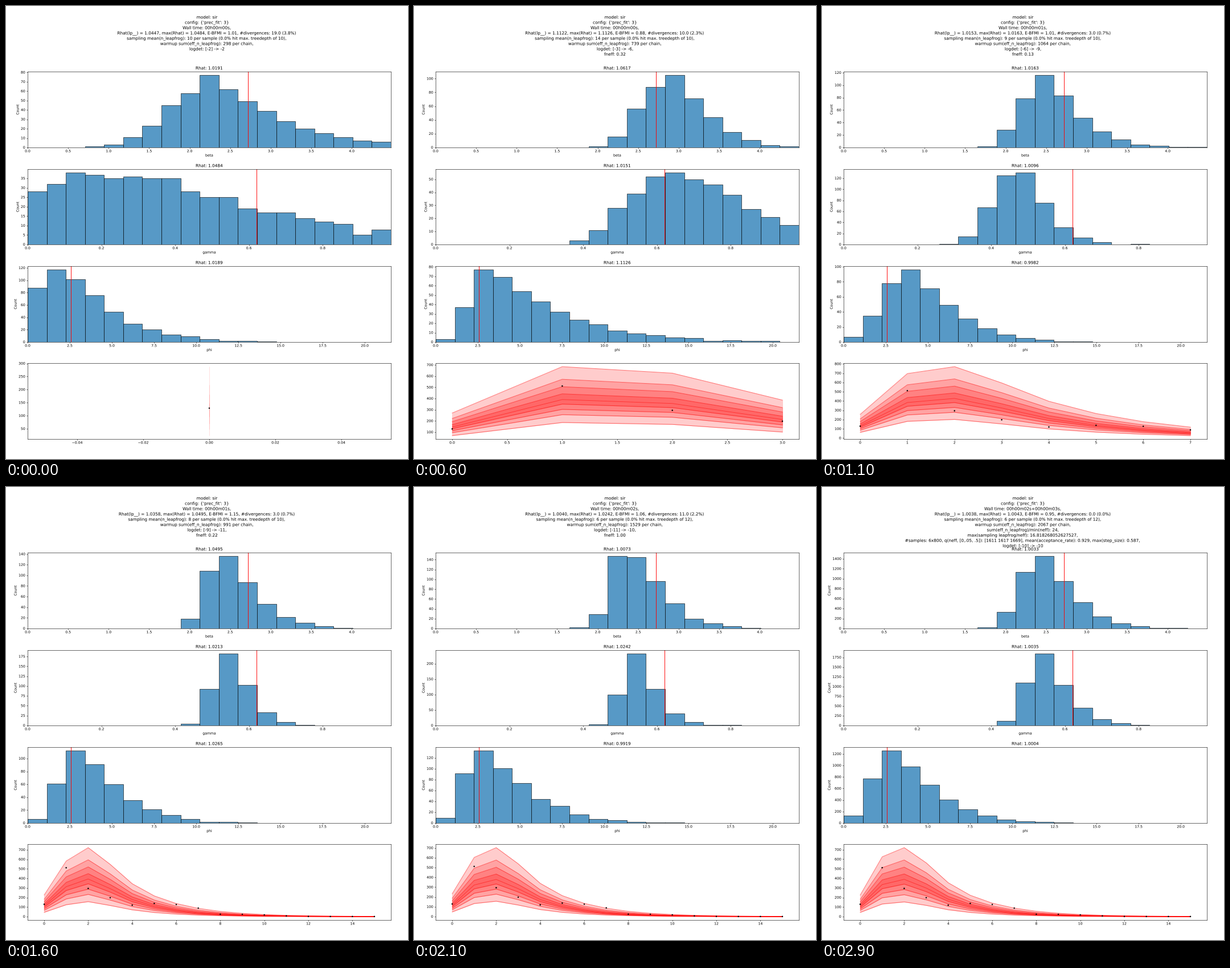
Recreate the animation shown at these times as a matplotlib script. Size 706 px wide and 794 px high, loop 3.1 s.

```python
import numpy as np
import matplotlib.pyplot as plt
from matplotlib import patheffects
from matplotlib.animation import FuncAnimation

W, H, DPI = 706, 794, 44.125
BINS = 19
LEFT, RIGHT = 38, 676
PARAMS = [("beta", 4.484, 2.718), ("gamma", 0.985, 0.6205), ("phi", 21.55, 2.57)]
OBSERVED = [129, 512, 295, 198, 120, 138, 127, 89, 25, 24, 18, 7, 2, 1, 1, 1]
LEVELS = [-1, -0.57, -0.34, -0.145, 0, 0.22, 0.46, 0.68, 1]

plt.rcParams.update({
    "axes.linewidth": 0.95,
    "xtick.major.width": 0.95,
    "ytick.major.width": 0.95,
    # Drawing text as paths keeps its sub-pixel position.
    "path.effects": [patheffects.Normal()],
})
rng = np.random.default_rng(3)


def header(wall, lp, top, bfmi, div, leap, depth, warm, *rest):
    return [
        "model: sir",
        "config: {'prec_fit': 3}",
        f"Wall time: {wall},",
        f"Rhat(lp__) = {lp}, max(Rhat) = {top}, E-BFMI = {bfmi}, #divergences: {div}",
        f"sampling mean(n_leapfrog): {leap} per sample (0.0% hit max. treedepth of {depth}),",
        f"warmup sum(eff_n_leapfrog): {warm} per chain,",
        *rest,
    ]


def histogram(peak, mode, left, right):
    """Skewed bell over the bins with a little sampling noise."""
    d = np.arange(BINS) - mode
    shape = np.exp(-np.where(d < 0, np.abs(d / left) ** 2.4, np.abs(d / right) ** 1.35))
    shape += 0.4 * np.sqrt(shape / peak) * rng.normal(size=BINS)
    return np.round(peak * np.clip(shape / shape.max(), 0, 1))


def epidemic(days, low, high, *start, fall=0.61):
    """Quantile curves around a median that decays after its first days."""
    mid = np.append(start, start[-1] * fall ** np.arange(1, days - len(start) + 1))
    high = high * (mid.max() / mid) ** 0.1
    return [mid * np.exp(z * (low if z < 0 else high)) for z in LEVELS]


stages = []


def stage(head, rhats, beta, gamma, phi, curves):
    stages.append((head, rhats.split(), [histogram(*p) for p in (beta, gamma, phi)], curves))


stage(header("00h00m00s", "1.0447", "1.0484", "1.01", "19.0 (3.8%)", 10, 10, 298,
             "logdet: [-2] -> -2"),
      "1.0191 1.0484 1.0189",
      (77, 9.3, 3.4, 4.3), (38, 4.5, 8, 9.5), (117, 1, 1.63, 3.2),
      epidemic(1, 1.626, 0.859, 122))

stage(header("00h00m00s", "1.0968", "1.0226", "0.68", "7.0 (2.8%)", 9, 10, 769,
             "logdet: [-2] -> -3,", "fneff: 0.66"),
      "1.0174 1.0186 1.0226",
      (51, 9.8, 1.75, 3), (24, 4, 4.2, 8), (57, 1, 0.94, 3.4),
      epidemic(2, 1.18, 0.673, 139, 398))

stage(header("00h00m00s", "1.1122", "1.1126", "0.88", "10.0 (2.3%)", 14, 10, 739,
             "logdet: [-3] -> -6,", "fneff: 0.32"),
      "1.0617 1.0151 1.1126",
      (105, 12, 2.3, 2.1), (55, 12.3, 3.4, 4.5), (77, 2, 1.2, 4.5),
      epidemic(4, 0.74, 0.561, 146, 391, 356, 213))

stage(header("00h00m01s", "1.0153", "1.0163", "1.01", "3.0 (0.7%)", 9, 10, 1064,
             "logdet: [-6] -> -9,", "fneff: 0.13"),
      "1.0163 1.0096 0.9982",
      (116, 10.2, 1.85, 2.15), (130, 8.75, 1.95, 1.65), (96, 2.9, 1.9, 2.85),
      epidemic(8, 0.75, 0.589, 132, 384, 428, 325, fall=0.65))

stage(header("00h00m01s", "1.0358", "1.0495", "1.15", "3.0 (0.7%)", 8, 10, 991,
             "logdet: [-9] -> -11,", "fneff: 0.22"),
      "1.0495 1.0213 1.0265",
      (136, 9.85, 1.35, 1.95), (182, 10, 1.13, 1.33), (112, 2.1, 1.32, 2.6),
      epidemic(16, 0.92, 0.607, 114, 313, 394, 293))

stage(header("00h00m02s", "1.0040", "1.0242", "1.06", "11.0 (2.2%)", 6, 12, 1529,
             "logdet: [-11] -> -10,", "fneff: 1.00"),
      "1.0073 1.0242 0.9919",
      (147, 9.6, 1.3, 2.15), (232, 10, 1.1, 1.3), (133, 1.9, 1.3, 2.8),
      epidemic(16, 0.88, 0.619, 116, 322, 379, 285))

stage(header("00h00m02s+00h00m03s", "1.0038", "1.0043", "0.95", "0.0 (0.0%)", 6, 12, 2067,
             "sum(eff_n_leapfrog)/min(neff): 24,",
             "max(sampling leapfrog/neff): 16.818268052627527,",
             "#samples: 6x800, q(neff, [0,.05, .5]): [1611 1617 1669], "
             "mean(acceptance_rate): 0.929, max(step_size): 0.587,",
             "logdet: [-10] -> -10"),
      "1.0033 1.0035 1.0004",
      (1452, 9.9, 1.6, 2), (1843, 10, 1.31, 1.56), (1255, 2.1, 1.5, 2.63),
      epidemic(16, 0.93, 0.616, 112, 335, 390, 299))

# The small excess keeps the pixel size from being truncated.
fig = plt.figure(figsize=((W + 0.01) / DPI, (H + 0.01) / DPI), dpi=DPI)


def panel(top, bottom):
    return fig.add_axes([LEFT / W, (H - bottom) / H, (RIGHT - LEFT) / W, (bottom - top) / H])


axes = [panel(115, 248), panel(286, 418), panel(456, 589), panel(626, 759)]
lines = [fig.text(0.5, 1 - (22.1 + 9.27 * i) / H, "", fontsize=12, ha="center")
         for i in range(10)]


def draw_hist(ax, param, rhat, counts):
    name, xmax, truth = param
    width = xmax / BINS
    bins = np.flatnonzero(counts)
    ax.bar(bins * width, counts[bins], width, align="edge",
           facecolor=(0.122, 0.467, 0.706, 0.75), edgecolor="k", linewidth=1)
    ax.axvline(truth, color="r", lw=1.5)
    ax.set(xlim=(0, xmax), ylim=(0, 1.05 * counts.max()), xlabel=name, ylabel="Count",
           title=f"Rhat: {rhat}")


def draw_bands(ax, curves):
    days = np.arange(len(curves[0]))
    for i in range(4):
        ax.fill_between(days, curves[i], curves[-1 - i], color="r", alpha=0.2)
    for curve in curves:
        ax.plot(days, curve, color="r", alpha=0.5, lw=1.5)
    ax.plot(days, OBSERVED[:len(days)], "k.")


def update(k):
    head, rhats, hists, curves = stages[(k + 4) // 5]
    for i, line in enumerate(lines):
        line.set_text(head[i] if i < len(head) else "")
    for ax in axes:
        ax.clear()
    for args in zip(axes, PARAMS, rhats, hists):
        draw_hist(*args)
    draw_bands(axes[3], curves)


anim = FuncAnimation(fig, update, frames=31, interval=100, init_func=lambda: update(0),
                     repeat=True, repeat_delay=0)
plt.show()
```
